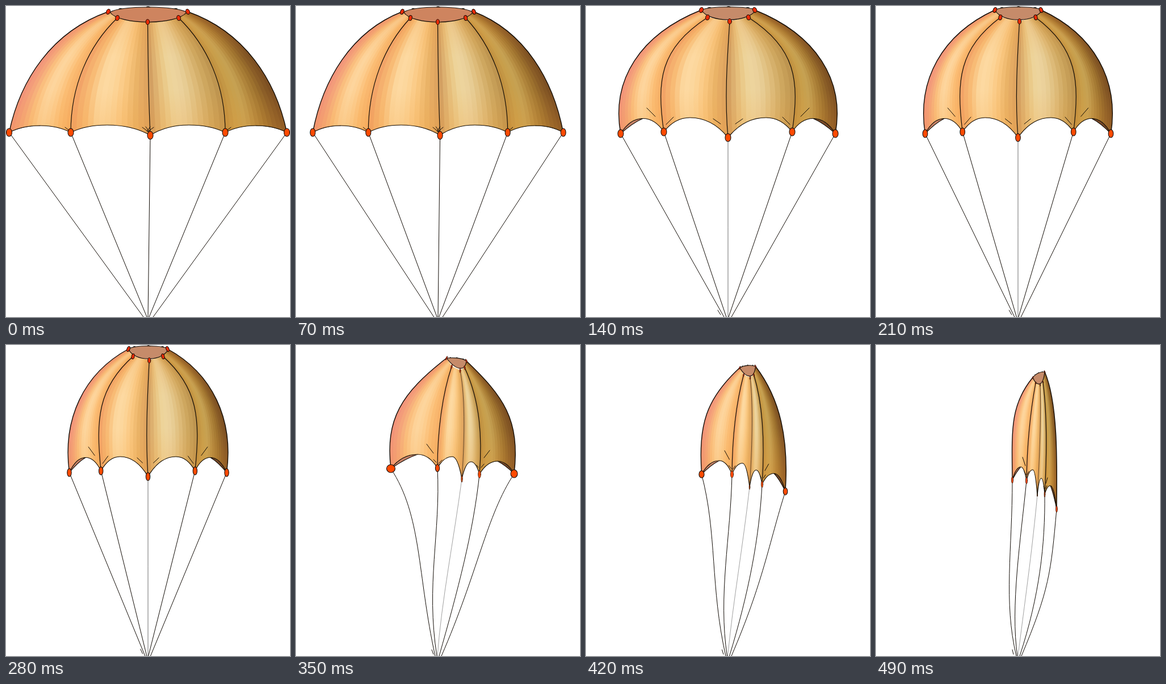
These frames come from a looping animation (500x546 px, 0.56 s). An HTML page:

```html
<!DOCTYPE html>
<html lang="en">
<head>
<meta charset="utf-8">
<title>Parachute</title>
<style>
html, body { margin: 0; width: 100%; height: 100%; overflow: hidden; background: #fff; }
svg { display: block; width: 100vw; height: 100vh; }
</style>
</head>
<body>
<svg id="stage" viewBox="0 0 500 546" fill="none" stroke-linecap="round" stroke-linejoin="round">
  <defs>
    <clipPath id="hull"><path id="hullPath"/></clipPath>
    <linearGradient id="warm" gradientUnits="userSpaceOnUse" x1="0" y1="0" x2="0" y2="235">
      <stop offset="0" stop-color="#e8923c" stop-opacity=".32"/>
      <stop offset=".38" stop-color="#f0a040" stop-opacity="0"/>
      <stop offset=".62" stop-color="#f0a040" stop-opacity="0"/>
      <stop offset="1" stop-color="#f49a34" stop-opacity=".26"/>
    </linearGradient>
  </defs>
</svg>
<script>
const STEP = 70, COUNT = 8, MID = 250, FLOOR = 546, STRIPS = 14;
const INK = '#120c06';
const stage = document.getElementById('stage');
const hullPath = document.getElementById('hullPath');

// Geometry helpers: flat arrays alternate x and y.
const lerp = (a, b, t) => a + (b - a) * t;
const mix = (a, b, t) => Array.isArray(a) ? a.map((v, i) => mix(v, b[i], t)) : lerp(a, b, t);
const scaleX = (a, k, c = MID) => Array.isArray(a[0])
  ? a.map(v => scaleX(v, k, c))
  : a.map((v, i) => i % 2 ? v : c + (v - c) * k);
const flip = a => scaleX(a, -1);
const mirror = (half, centre) => [...half, ...(centre ? [centre] : []), ...half.map(flip).reverse()];
const reversed = a => [6, 7, 4, 5, 2, 3, 0, 1].map(i => a[i]);
const num = a => a.map(v => v.toFixed(1)).join(' ');
const move = a => 'M' + num(a.slice(0, 2));
const curve = a => 'C' + num(a.slice(2, 8));
const foot = rib => rib.slice(6, 8);
const at = (a, t) => {
  const u = 1 - t, w = [u * u * u, 3 * u * u * t, 3 * u * t * t, t * t * t];
  return [0, 1].map(j => w.reduce((s, v, i) => s + v * a[2 * i + j], 0));
};
const straight = (rib, endX) => {
  const b = foot(rib), e = [endX, FLOOR];
  return [...mix(b, e, 1 / 3), ...mix(b, e, 2 / 3), ...e];
};

// Ribs run from crown to hem; cords continue from the hem to the floor.
const wide = {
  ribs: mirror([
    [180, 10, 80, 45, 25, 130, 5.5, 222],
    [196, 21, 145, 70, 114, 140, 114, 222]
  ], [249.5, 28, 250, 100, 251, 165, 254, 227]),
  peaks: mirror([[60, 210], [178, 209]]),
  ring: [183, 11, 200, -1, 300, -1, 318, 11, 300, 34, 200, 34],
  knots: [[5, 7], [5, 7], [5, 7], [5, 7], [5, 7]],
  studs: [3.3, 4.6],
  ticks: mirror([[104, 213, 112, 219]]),
  creases: mirror([[240, 213, 251, 221], [246, 212, 252, 220]]),
  stray: [246, 546, 247, 546],
  lining: [0, 0]
};
wide.cords = wide.ribs.map((r, i) => straight(r, [242, 248, 250, 252, 259][i]));

const round = {
  ribs: mirror([
    [203, 7, 95, 50, 44, 130, 61, 224],
    [214, 20, 130, 75, 124, 130, 137, 221]
  ], [253, 27, 248, 100, 244, 165, 250, 231]),
  peaks: mirror([[100, 197.5], [183, 196]]),
  ring: [203, 7, 218, 0, 284, 0, 299, 7, 285, 30, 217, 30],
  knots: [[5, 7], [5, 7], [5, 7], [5, 7], [5, 7]],
  studs: [3.4, 4.6],
  ticks: mirror([[107, 179, 122, 194]]),
  creases: mirror([[224, 198, 237, 207], [141, 208, 154, 195]]),
  stray: [232, 534, 237, 542],
  lining: [1, 1]
};
round.cords = round.ribs.map((r, i) => straight(r, [243, 247, 250, 251, 256][i]));

const limp = {
  ribs: [
    [265, 23, 185, 85, 157, 130, 167, 217],
    [274, 38, 258, 85, 249, 150, 249, 216],
    [289, 45, 299, 95, 296, 180, 292, 235],
    [297, 40, 325, 100, 328, 165, 323, 227],
    [300, 28, 365, 90, 395, 130, 384, 226]
  ],
  cords: [
    [222, 300, 213, 400, 245, FLOOR],
    [255, 330, 228, 420, 248, FLOOR],
    [278, 340, 256, 450, 249, FLOOR],
    [312, 330, 285, 430, 252, FLOOR],
    [335, 300, 320, 400, 256, FLOOR]
  ],
  peaks: [[214, 192], [275, 196], [308, 205], [355, 204]],
  ring: [265, 23, 275, 22, 292, 22, 300, 28, 298, 46, 283, 46],
  knots: [[7.5, 7], [3.6, 6.5], [1.2, 6], [2.4, 6.5], [6, 7]],
  studs: [1, 3.6],
  ticks: [[230, 174, 242, 190], [341, 185, 331, 198]],
  creases: [[251, 208, 257, 202], [247, 206, 242, 201], [321, 215, 318, 211], [326, 215, 331, 209]],
  stray: [239, 535, 242, 543],
  lining: [1, 1]
};

const folded = {
  ribs: [
    [276, 57, 236, 105, 239, 150, 240, 237],
    [281, 67, 273, 110, 266, 170, 265, 238],
    [289, 70, 291, 120, 288, 200, 284, 264],
    [294, 65, 301, 120, 301, 190, 297, 262],
    [297, 47, 320, 100, 319, 200, 318, 288]
  ],
  cords: [
    [240, 360, 224, 450, 247, FLOOR],
    [255, 340, 236, 460, 249, FLOOR],
    [274, 370, 262, 450, 250, FLOOR],
    [298, 350, 288, 440, 253, FLOOR],
    [308, 400, 305, 430, 256, FLOOR]
  ],
  peaks: [[255, 214], [276, 219], [291, 234], [307, 247]],
  ring: [276, 57, 282, 49, 290, 47, 297, 47, 294, 76, 282, 72],
  knots: [[1.6, 5.5], [1.7, 5.5], [.5, 2], [.9, 5], [1.5, 5.5]],
  studs: [.6, 2.5],
  ticks: [[258, 197, 263, 212], [302, 233, 299, 243]],
  creases: [[266, 228, 269, 222], [264, 228, 261, 222], [296, 252, 295, 248], [299, 252, 301, 247]],
  stray: [240, 535, 242, 543],
  lining: [1, 1]
};

const blend = (a, b, t) => Object.fromEntries(Object.keys(a).map(k => [k, mix(a[k], b[k], t)]));
const squeeze = (p, k) => Object.fromEntries(Object.entries(p).map(([key, v]) =>
  [key, key === 'lining' ? v : scaleX(v, k, key === 'knots' || key === 'studs' ? 0 : MID)]));

const poses = [
  wide, squeeze(wide, .902), round, squeeze(round, .865), squeeze(round, .733),
  limp, blend(limp, folded, .5), folded
];

// Cloth colours across each panel, left to right.
const ramps = [
  'f2947a f5a67a fbc27f fdd7a0 fdd093 fbbe75 f8b168',
  'f2a468 f8bd76 fddaa3 fcd69b fac881 ebb468 dfa45f',
  'd3a062 e8c27e eed69e ead09a dfbd7c cfa860 be9550',
  'c0903f c99f4b c5a153 b4893e a0752f 8b5e27 7c4f22'
].map(s => s.split(' ').map(h => [0, 2, 4].map(i => parseInt(h.slice(i, i + 2), 16))));
const shade = (ramp, t) => {
  const x = t * (ramp.length - 1), i = Math.min(ramp.length - 2, Math.floor(x));
  return `rgb(${mix(ramp[i], ramp[i + 1], x - i).map(Math.round)})`;
};

const add = (tag, attrs = {}, parent = stage) => {
  const el = document.createElementNS('http://www.w3.org/2000/svg', tag);
  set(el, attrs);
  parent.appendChild(el);
  return el;
};
function set(el, attrs) {
  for (const k in attrs) el.setAttribute(k, attrs[k]);
}
const times = (n, make) => Array.from({ length: n }, (_, i) => make(i));
const line = (width = 1.2) => add('path', { stroke: INK, 'stroke-width': width });
const dot = fill => add('ellipse', { fill, stroke: INK, 'stroke-width': 1 });

const cords = times(5, () => line(1));
const stray = line(1);
const linings = ['#c98468', '#7a4a28'].map(fill => add('path', { fill, stroke: INK, 'stroke-width': 1.1 }));
const cloth = add('g', { 'clip-path': 'url(#hull)' });
const strips = ramps.map(r => times(STRIPS, i =>
  add('path', { fill: shade(r, i / (STRIPS - 1)) }, cloth)));
add('rect', { width: 500, height: FLOOR, fill: 'url(#warm)' }, cloth);
const hem = line(1.2);
const ribs = times(5, i => line(i % 4 ? 1.2 : 1.4));
const backs = times(3, () => add('ellipse', { fill: INK }));
const ring = add('path', { stroke: INK, 'stroke-width': 1.2 });
const studs = times(5, () => dot('#ee2c08'));
const wrinkles = line(1);
const knots = times(5, () => dot('#ff4a00'));

// Half an arch, from a hem corner to the peak of its scallop.
const bend = (b, p, k, drop = 0) => [lerp(b[0], p[0], k), lerp(p[1], b[1], drop)];
const arch = (a, p, b) =>
  `Q${num([...bend(a, p, .42), ...p])}Q${num([...bend(b, p, .42), ...b])}`;
const segment = s => `M${num(s.slice(0, 2))}L${num(s.slice(2))}`;

function draw(index) {
  const p = poses[index], feet = p.ribs.map(foot), late = index > 4;
  const scallops = p.peaks.map((k, i) => arch(feet[i], k, feet[i + 1])).join('');

  set(hullPath, {
    d: `M${num(feet[0])}${scallops}${curve(reversed(p.ribs[4]))}L${num(p.ribs[0].slice(0, 2))}${curve(p.ribs[0])}Z`
  });
  set(hem, { d: `M${num(feet[0])}${scallops}` });

  strips.forEach((row, n) => row.forEach((el, i) => {
    const left = mix(p.ribs[n], p.ribs[n + 1], i / STRIPS), right = p.ribs[n + 1];
    set(el, { d: `${move(left)}${curve(left)}L${num(foot(right))}${curve(reversed(right))}Z` });
  }));

  linings.forEach((el, i) => {
    const b = feet[i * 4], k = p.peaks[i * 3], v = p.lining[i];
    set(el, {
      d: `M${num(b)}Q${num([...bend(b, k, .42), ...k])}Q${num([...bend(b, k, .42 + v * .12, v * .3), ...b])}Z`
    });
  });

  ribs.forEach((el, i) => set(el, {
    d: move(p.ribs[i]) + curve(p.ribs[i]),
    'stroke-width': i === 2 && late ? .6 : i % 4 ? 1.2 : 1.4
  }));
  cords.forEach((el, i) => {
    const thin = i === 2 && index > 1;
    set(el, {
      d: `M${num(feet[i])}C${num(p.cords[i])}`,
      stroke: thin ? (late ? '#777' : '#333') : INK,
      'stroke-width': thin ? .7 : 1
    });
  });
  set(stray, { d: segment(p.stray), visibility: index > 1 ? 'visible' : 'hidden' });

  const r = p.ring;
  set(ring, {
    d: `${move(r)}${curve(r)}C${num([...r.slice(8), r[0], r[1]])}Z`,
    fill: index < 2 ? '#ce845f' : '#c68b6a'
  });
  backs.forEach((el, i) => {
    const [cx, cy] = at(r, [.2, .5, .8][i]);
    set(el, { cx, cy, rx: p.studs[0], ry: 1.6 });
  });
  studs.forEach((el, i) => {
    const [cx, cy] = p.ribs[i];
    set(el, {
      cx, cy, rx: p.studs[0], ry: p.studs[1],
      transform: `rotate(${(2 - i) * 12} ${cx} ${cy})`,
      'stroke-width': late ? .6 : 1
    });
  });
  knots.forEach((el, i) => {
    const [cx, cy] = feet[i], [rx, ry] = p.knots[i];
    set(el, { cx, cy, rx, ry, 'stroke-width': rx < 3 ? .7 : 1.1 });
  });
  set(wrinkles, { d: [...p.ticks, ...p.creases].map(segment).join('') });
}

const start = performance.now();
let shown = -1;
function tick() {
  const index = Math.floor((performance.now() - start) / STEP) % COUNT;
  if (index !== shown) draw(shown = index);
  requestAnimationFrame(tick);
}
tick();
</script>
</body>
</html>
```
